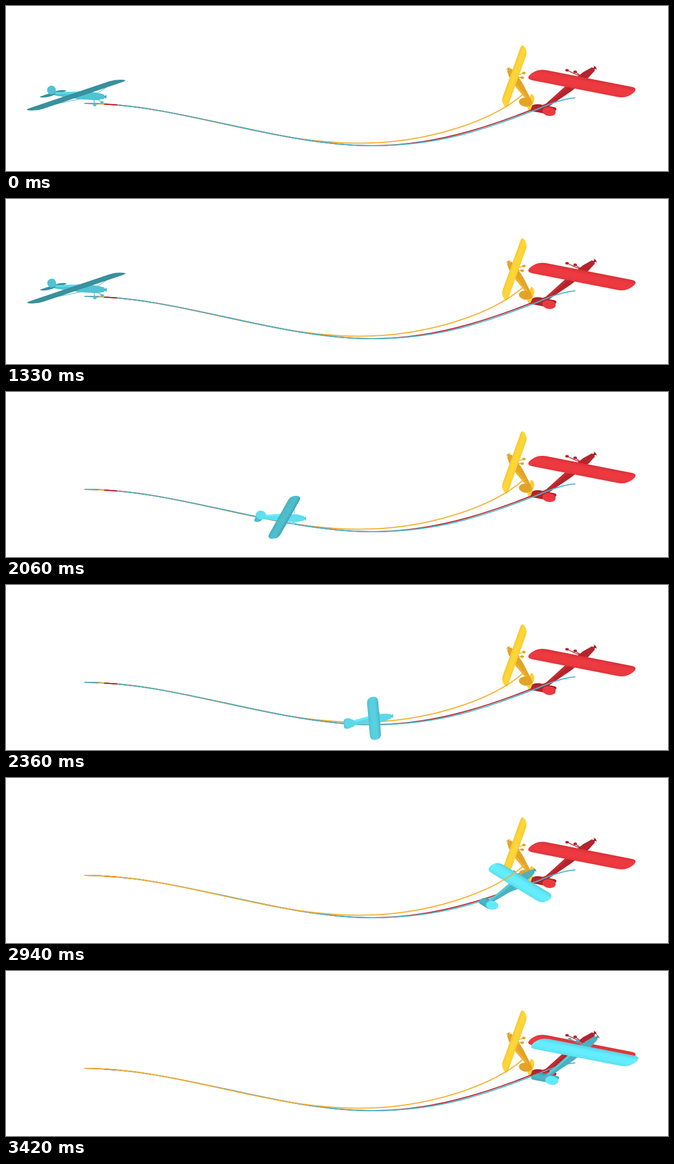
Recreate the animation shown at these times as an HTML page with a canvas. Size 1200 by 300 pixels, loop 5000 ms.

```html
<!DOCTYPE html>
<html lang="en">
<head>
<meta charset="utf-8">
<title>Three planes</title>
<style>
  html, body { margin: 0; width: 100%; height: 100%; overflow: hidden; background: #fff; }
  canvas { display: block; width: 1200px; height: 300px; }
</style>
</head>
<body>
<canvas id="stage" width="1200" height="300"></canvas>
<script>
const ctx = document.getElementById('stage').getContext('2d');
const LOOP = 5000, TAKEOFF = 1330, LANDING = 3420;

const CYAN = { dark: [56, 142, 155], light: [100, 238, 255] };
const RED = { dark: [160, 30, 38], light: [238, 58, 64] };
const GOLD = { dark: [226, 160, 38], light: [255, 217, 56] };

const clamp = (v, lo = 0, hi = 1) => Math.min(hi, Math.max(lo, v));
const mix = (a, b, k) => a + (b - a) * k;
const smooth = (from, to, v) => {
  const k = clamp((v - from) / (to - from));
  return k * k * (3 - 2 * k);
};
const shade = ({ dark, light }, k) =>
  `rgb(${dark.map((c, i) => Math.round(mix(c, light[i], clamp(k)))).join()})`;

// Start point plus any number of [vector, factor] pairs.
const add = (p, ...terms) => terms.reduce(
  ([x, y], [v, k]) => [x + v[0] * k, y + v[1] * k], p);

// The projected axes of a plane that banks and turns away; u runs from 0 to 1.
function flightPose(u) {
  const bow = u * (1 - u);
  const wingTone = clamp(1.35 * u, 0, .96);
  const bodyTone = mix(.55 + .85 * u, .38, smooth(.4, .65, u));
  return {
    center: [127 + 922 * (u + .75 * u * bow),
      162 - 14 * u + bow * (350 - 1750 * (u - .5) ** 2)],
    span: [83 - 175 * u, -28 - 54 * u + 64 * u * u],
    forward: [103 - 60 * bow, 6 - 87 * smooth(.28, .95, u)],
    up: [15 * u - 6, -7 * Math.cos(Math.PI * u)],
    hang: [16 - 30 * u, 1],
    finLength: 8 + 4 * u,
    wingTone, bodyTone,
    stabTone: Math.min(wingTone, bodyTone),
    finTone: Math.max(wingTone, bodyTone)
  };
}

const parked = flightPose(1);
const redPose = { ...parked, center: add(parked.center, [[-5, -7], 1]), bodyTone: .25, stabTone: .2 };
const goldPose = {
  center: [921.5, 128], span: [19, -53], forward: [-44, -66], up: [-8, 2], hang: [5, 10],
  finLength: 12, wingTone: .92, bodyTone: .08, stabTone: .85, finTone: .05
};

function line(from, to, color, width = 1) {
  ctx.beginPath();
  ctx.moveTo(...from);
  ctx.lineTo(...to);
  ctx.strokeStyle = color;
  ctx.lineWidth = width;
  ctx.stroke();
}

function oval([x, y], rx, ry, angle, color) {
  ctx.beginPath();
  ctx.ellipse(x, y, rx, ry, angle, 0, Math.PI * 2);
  ctx.fillStyle = color;
  ctx.fill();
}

function polygon(points, color) {
  ctx.beginPath();
  points.forEach(p => ctx.lineTo(...p));
  ctx.closePath();
  ctx.fillStyle = color;
  ctx.fill();
}

// A parallelogram with round tips, lit across its chord.
function drawWing(center, span, chord, palette, tone) {
  const corner = (s, c) => add(center, [span, s], [chord, c]);
  const tip = Math.hypot(...chord) / Math.hypot(...span);
  ctx.beginPath();
  for (const side of [1, -1]) {
    const inner = side * (1 - Math.min(.5, tip));
    ctx.lineTo(...corner(inner, side));
    ctx.quadraticCurveTo(...corner(side, side), ...corner(side, 0));
    ctx.quadraticCurveTo(...corner(side, -side), ...corner(inner, -side));
  }
  ctx.closePath();
  const normal = [-span[1], span[0]];
  const reach = (chord[0] * normal[0] + chord[1] * normal[1]) / (span[0] ** 2 + span[1] ** 2);
  const light = ctx.createLinearGradient(
    ...add(center, [normal, reach]), ...add(center, [normal, -reach]));
  [-.25, .03, .03, -.12].forEach((d, i) => light.addColorStop(i / 3, shade(palette, tone + d)));
  ctx.fillStyle = light;
  ctx.fill();
}

function drawPlane(pose, palette) {
  const { center, span, forward, up, hang } = pose;
  const length = Math.hypot(...forward);
  const side = [forward[1] / length, -forward[0] / length];
  const at = (along, across = 0) => add(center, [hang, 1], [forward, along], [side, across]);
  const body = shade(palette, pose.bodyTone);
  const dim = shade(palette, pose.bodyTone - .2);

  for (const s of [1, -1]) {
    line(at(.15), add(center, [span, s * .8]), dim);
    const wheel = add(at(.12), [up, -2], [span, s * .08]);
    line(at(.15), wheel, body, 1.5);
    oval(wheel, 3.2, 2.4, 0, body);
  }
  line(at(.3), at(.38), dim, 4);
  line(at(.37, -4), at(.37, 4), dim, 1.2);

  const stab = span.map(v => v * .24), stabChord = forward.map(v => v * .075);
  drawWing(at(-.56), stab, stabChord, palette, pose.stabTone);
  polygon([at(.34, 4), at(.2, 7), at(-.1, 7), at(-.53, 3),
    at(-.53, -3), at(-.1, -7), at(.2, -7), at(.34, -4)], body);
  polygon([at(-.05, 7), at(-.53, 3), at(-.5), at(-.05, 3)], shade(palette, pose.bodyTone + .25));
  oval(add(at(-.53), [up, 1]), pose.finLength, 8, .15, shade(palette, pose.finTone));
  drawWing(center, span, forward.map(v => v * .115), palette, pose.wingTone);
}

// Every rope leaves the same point, sags to its lowest point and climbs to its end.
function rope(low, pull, end, color, hook) {
  ctx.beginPath();
  ctx.moveTo(142, 177);
  ctx.bezierCurveTo(312, 177, low[0] - 175, low[1], ...low);
  ctx.bezierCurveTo(low[0] + 125, low[1], ...pull, ...end);
  if (hook) ctx.quadraticCurveTo(1005, 169, ...hook);
  ctx.strokeStyle = color;
  ctx.lineWidth = 2;
  ctx.stroke();
}

const goldRope = () => rope([640, 249.5], [885, 208], [940, 158], '#f6b02e');

function draw(t) {
  const u = clamp((t - TAKEOFF) / (LANDING - TAKEOFF));
  const goldInFront = u > .6;
  ctx.fillStyle = '#fff';
  ctx.fillRect(0, 0, 1200, 300);
  drawPlane(redPose, RED);
  drawPlane(goldPose, GOLD);

  if (!goldInFront) goldRope();
  rope([665, 254], [898, 211], [998, 171], '#c4262f');
  rope([665, 254], [870, 223], [965, 187], '#4ab8cc', [1032, 167]);
  line([168, 178], [180, 178.6], '#f6b02e', 2);
  line([178, 178.5], [202, 180], '#c4262f', 2);

  drawPlane(flightPose(u), CYAN);
  if (goldInFront) goldRope();
}

function tick() {
  draw(performance.now() % LOOP);
  requestAnimationFrame(tick);
}
tick();
</script>
</body>
</html>
```
